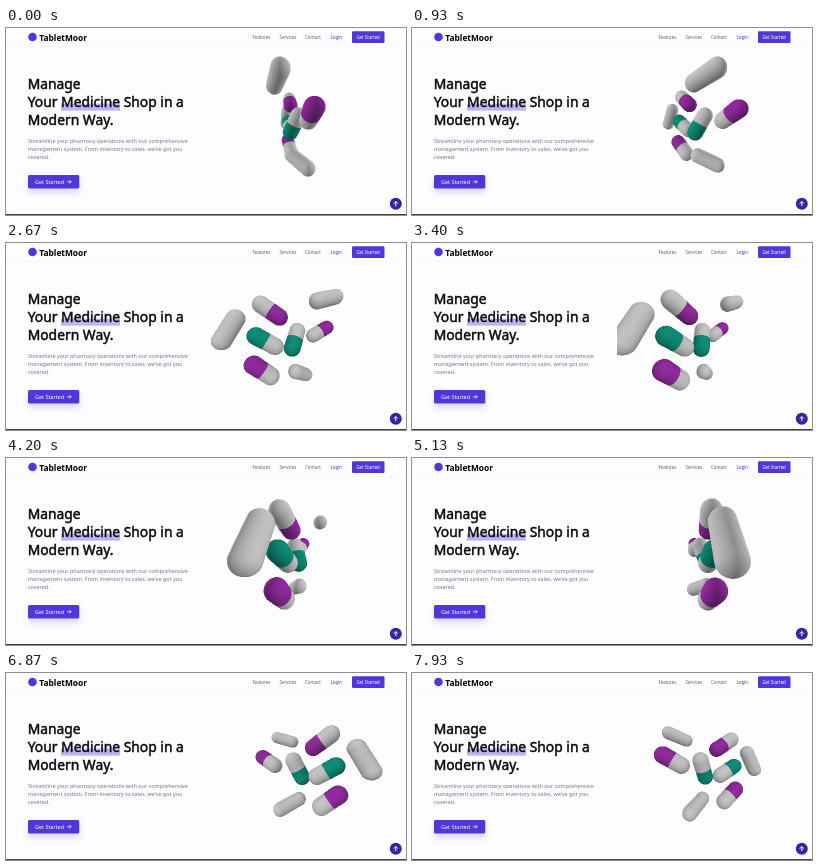
These frames come from a looping animation (400x187 px, 8 s). An HTML page with a canvas:

```html
<!DOCTYPE html>
<html lang="en">
<head>
<meta charset="utf-8">
<title>TabletMoor</title>
<style>
  html, body { margin: 0; width: 100%; height: 100%; overflow: hidden; background: #fdfcfe; }
  svg, canvas { position: absolute; display: block; }
  svg { left: 0; top: 0; font-family: "Noto Sans", "Open Sans", sans-serif; }
  canvas { left: 205px; top: 16px; width: 172px; height: 160px; }
  .brand { font-size: 8.4px; font-weight: 600; }
  .nav { font-size: 4.4px; fill: #606068; }
  .title { font-size: 13.85px; fill: #08080c; stroke: #08080c; stroke-width: .45; }
  .lead { font-size: 5.44px; fill: #747984; }
  .line { fill: none; stroke: #fff; stroke-width: .7; }
</style>
</head>
<body>
<svg width="400" height="187" viewBox="0 0 400 187">
  <path d="M0 18.5H400" stroke="#f4f3f7" stroke-width=".6"/>
  <circle cx="26.5" cy="9" r="4.3" fill="#4f37d8"/>
  <text class="brand" x="33.3" y="12.6">TabletMoor</text>
  <g class="nav">
    <text x="246.5" y="11">Features</text>
    <text x="273.5" y="11">Services</text>
    <text x="299" y="11">Contact</text>
    <text x="324.5" y="11" fill="#4f37d8">Login</text>
    <rect x="346" y="3.3" width="32.5" height="11.7" rx="1.3" fill="#4f37d8"/>
    <text x="350.4" y="11" fill="#fff">Get Started</text>
  </g>
  <rect x="55" y="75.6" width="59" height="7" fill="#bcb3f2"/>
  <g class="title">
    <text x="21.7" y="61.3">Manage</text>
    <text x="21.7" y="79">Your Medicine Shop in a</text>
    <text x="21.7" y="96.6">Modern Way.</text>
  </g>
  <g class="lead">
    <text x="22" y="114.6">Streamline your pharmacy operations with our comprehensive</text>
    <text x="22" y="122.8">management system. From inventory to sales, we’ve got you</text>
    <text x="22" y="131">covered.</text>
  </g>
  <rect x="22" y="147" width="51.3" height="13.6" rx="1.5" fill="#4f37d8" style="filter:drop-shadow(0 4px 3px #4f37d833)"/>
  <text x="29" y="156.2" font-size="5.45" fill="#fff">Get Started</text>
  <path class="line" d="M61 153.8h4.2m-1.8-1.8 1.8 1.8-1.8 1.8"/>
  <circle cx="389.8" cy="175.8" r="6" fill="#3b22a0"/>
  <path class="line" style="stroke-width:1" d="M389.8 178.2v-4.6m-2 2 2-2 2 2"/>
  <path d="M0 186.5H400" stroke="#3c4440"/>
</svg>
<canvas id="scene" width="344" height="320"></canvas>
<script>
const SCALE = 2, CENTER_X = 85, CENTER_Y = 77, CAMERA = 110, SPIN = 0.0006, LOOP = 8000;
const WHITE = [222, 222, 222], PURPLE = [165, 50, 180], TEAL = [18, 160, 136];

// orbit: angle, radius, height; axis: heading and downward slope; body: half length and radius
const pill = (angle, orbit, y, heading, slope, tint = WHITE, half = 9.7, radius = 8) =>
  ({ angle, orbit, y, heading, slope, tint, half, radius });
const pills = [
  pill(-0.5, 30, -32.5, 0.4, -0.3, WHITE, 10.5, 6.9),
  pill(-2.88, 59, -5.5, 0.28, -0.88, WHITE, 11, 7.5),
  pill(0.5, 6, 38, 0.9, 0.4, WHITE, 10.5, 6.9),
  pill(-2.84, 25, -23, 0.15, 0.55, PURPLE),
  pill(0.4, 29, -5, 0.15, -0.5, PURPLE, 9, 7.6),
  pill(-2.87, 32, 31.5, -2.8, -0.62, PURPLE),
  pill(-2.85, 29, 5, -2.87, -0.5, TEAL),
  pill(-2.15, 2, 3, -2.15, 0.87, TEAL),
];

const canvas = document.getElementById("scene");
const ctx = canvas.getContext("2d");
const { width, height } = canvas;
const image = ctx.createImageData(width, height);
const depth = new Float32Array(width * height);
const dot = (a, b) => a[0] * b[0] + a[1] * b[1] + a[2] * b[2];
const along = (a, b, k) => [a[0] + b[0] * k, a[1] + b[1] * k, a[2] + b[2] * k];

function drawPill(p, turn) {
  const angle = p.angle + turn, heading = p.heading + turn;
  const flat = Math.sqrt(1 - p.slope ** 2);
  const middle = [p.orbit * Math.sin(angle), p.y, p.orbit * Math.cos(angle)];
  const axis = [flat * Math.sin(heading), p.slope, flat * Math.cos(heading)];
  const tail = along(middle, axis, -p.half), head = along(middle, axis, p.half);
  const eye = [0, 0, CAMERA], fromTail = along(eye, tail, -1), fromHead = along(eye, head, -1);
  const length = 2 * p.half, r2 = p.radius ** 2;
  const axisTail = dot(axis, fromTail), tail2 = dot(fromTail, fromTail);
  const light = turn - 1.5, lightX = Math.sin(light), lightZ = Math.cos(light);

  const ends = [tail, head].map(e => {
    const s = CAMERA / (CAMERA - e[2]);
    return { x: e[0] * s, y: e[1] * s, r: p.radius * s * 1.5 };
  });
  const range = (key, offset, limit) => [
    Math.max(0, Math.floor(SCALE * (offset + Math.min(...ends.map(e => e[key] - e.r))))),
    Math.min(limit, Math.ceil(SCALE * (offset + Math.max(...ends.map(e => e[key] + e.r))))),
  ];
  const [x0, x1] = range("x", CENTER_X, width), [y0, y1] = range("y", CENTER_Y, height);

  for (let py = y0; py < y1; py++) for (let px = x0; px < x1; px++) {
    const dx = (px + 0.5) / SCALE - CENTER_X, dy = (py + 0.5) / SCALE - CENTER_Y;
    const n = Math.hypot(dx, dy, CAMERA), ray = [dx / n, dy / n, -CAMERA / n];
    const slant = dot(axis, ray), rayTail = dot(ray, fromTail);
    const a = 1 - slant * slant, b = rayTail - axisTail * slant;
    const disc = b * b - a * (tail2 - axisTail ** 2 - r2);
    if (disc < 0) continue;
    let t = (-b - Math.sqrt(disc)) / a, s = axisTail + t * slant;
    if (s < 0 || s > length) {
      const origin = s < 0 ? fromTail : fromHead, k = dot(ray, origin);
      const cap = k * k - dot(origin, origin) + r2;
      if (cap < 0) continue;
      t = -k - Math.sqrt(cap);
      s = s < 0 ? 0 : length;
    }
    const i = py * width + px;
    if (t >= depth[i]) continue;
    depth[i] = t;
    const normal = along(along(along(eye, ray, t), tail, -1), axis, -s);
    const facing = Math.abs(normal[0] * lightX + normal[2] * lightZ) / p.radius;
    const shade = 0.58 + 0.27 * facing - 0.13 * normal[1] / p.radius;
    const color = s > p.half ? p.tint : WHITE;
    for (let c = 0; c < 3; c++) image.data[4 * i + c] = color[c] * shade;
    image.data[4 * i + 3] = 255;
  }
}

function render() {
  const turn = (performance.now() % LOOP) * SPIN;
  image.data.fill(0);
  depth.fill(Infinity);
  for (const p of pills) drawPill(p, turn);
  ctx.putImageData(image, 0, 0);
  requestAnimationFrame(render);
}
render();
</script>
</body>
</html>
```
